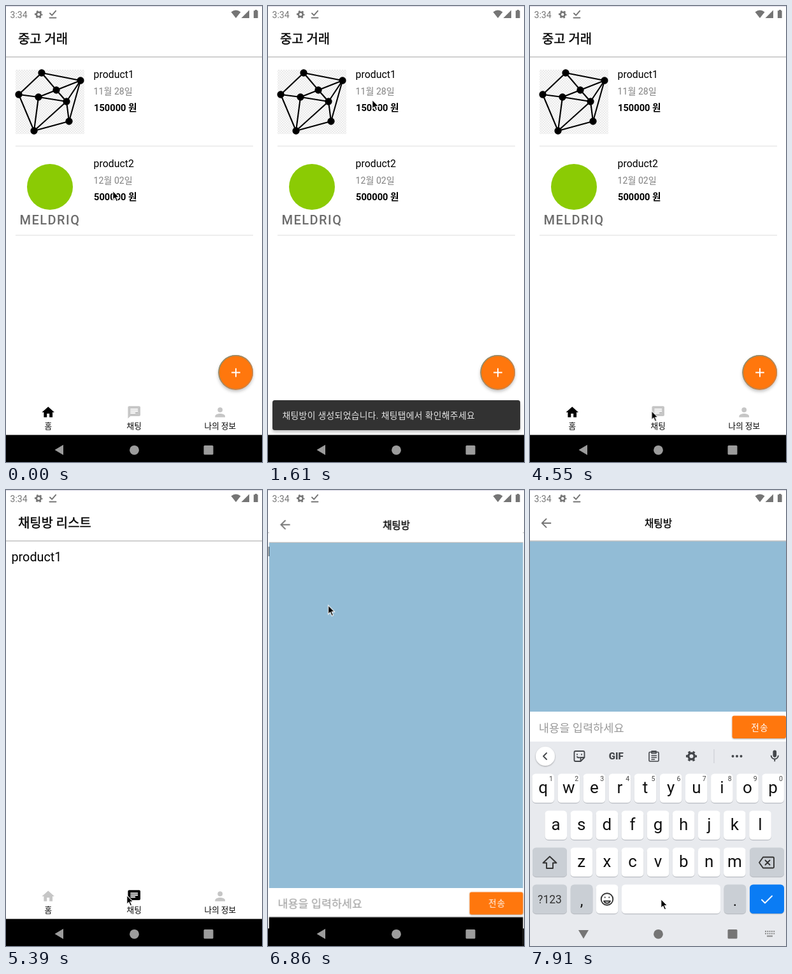
Animation of 402 by 716 pixels, one loop 8 s. Source, as an HTML page:

```html
<!DOCTYPE html>
<html lang="ko">
<head>
<meta charset="utf-8">
<title>중고 거래</title>
<style>
html, body { margin: 0; width: 100%; height: 100%; overflow: hidden; background: #fff; }
svg.stage { display: block; width: 402px; height: 716px; }
text { font-family: Roboto, "Noto Sans CJK KR", "Noto Sans CJK", sans-serif; }
.mid { text-anchor: middle; }
.heavy { stroke: #000; stroke-width: .4px; }
.line { fill: none; stroke-linecap: round; stroke-linejoin: round; }
.nav-label { font-size: 12.6px; text-anchor: middle; }
.name { font-size: 15.9px; }
.date { font-size: 14.1px; fill: #808080; }
.price { font-size: 14.66px; font-weight: 700; }

/* one shared 8 s clock: 1% = 80 ms */
.old, .home, .rooms, .home-tab, .chat-tab, .snack, .chat, .compose, .caret,
.keyboard, .nav, .back, .kb-icon, .pointer, .ring {
  animation: 8s linear infinite both;
}
.old, .chat { transform-origin: 201px 358px; }
.home { animation-name: home; }
.rooms { animation-name: rooms; }
.home-tab { animation-name: home-tab; }
.chat-tab { animation-name: chat-tab; }
.old { animation-name: old; }
.chat { animation-name: chat; }
.snack { animation-name: snack; transform-origin: 201px 642px; }
.compose { animation-name: compose; }
.caret { animation-name: caret; }
.keyboard { animation-name: keyboard; }
.nav { animation-name: nav; }
.back { animation-name: back; transform-origin: 84px 697px; }
.kb-icon { animation-name: kb-icon; }
.pointer { animation-name: pointer; }
.ring { animation-name: ring; }

@keyframes home { 0%, 61.25% { opacity: 1; } 65.6%, 100% { opacity: 0; } }
@keyframes rooms { 0%, 61.25% { opacity: 0; } 65.6%, 100% { opacity: 1; } }
@keyframes home-tab { 0%, 60.6% { fill: #000; } 61.3%, 100% { fill: #c6c6c6; } }
@keyframes chat-tab { 0%, 60.6% { fill: #c6c6c6; } 61.3%, 100% { fill: #000; } }
@keyframes old {
  0%, 82.24% { transform: none; }
  82.25%, 83% { transform: scale(1.0185); animation-timing-function: ease-out; }
  86.7%, 100% { transform: scale(1.05); }
}
@keyframes chat {
  0%, 82.24% { opacity: 0; transform: scale(.85); }
  82.25%, 83% { opacity: .33; transform: scale(.912, .905); }
  83.9% { opacity: 1; transform: scale(.955, .953); animation-timing-function: ease-out; }
  86.8%, 100% { opacity: 1; transform: none; }
}
@keyframes snack {
  0%, 17.2% { opacity: 0; transform: scale(.8); animation-timing-function: ease-out; }
  19.2% { opacity: 1; transform: scale(.985); }
  20.1%, 55% { opacity: 1; transform: none; }
  56%, 100% { opacity: 0; transform: none; }
}
@keyframes compose {
  0%, 91.8% { transform: translateY(279px); }
  91.81%, 100% { transform: none; }
}
@keyframes caret {
  0%, 92.7% { opacity: 0; }
  92.71%, 98.85% { opacity: 1; }
  98.86%, 100% { opacity: 0; }
}
@keyframes keyboard {
  0%, 92.2% { opacity: 0; transform: translateY(321px); }
  92.74%, 93.4% { opacity: .16; transform: translateY(242px); }
  94.5% { opacity: .7; transform: translateY(75px); animation-timing-function: ease-out; }
  96.2%, 100% { opacity: 1; transform: none; }
}
@keyframes nav { 0%, 93.4% { fill: #9c9c9c; } 95%, 100% { fill: #757575; } }
@keyframes back { 0%, 93.4% { transform: none; } 96.2%, 100% { transform: rotate(-90deg); } }
@keyframes kb-icon { 0%, 92.2% { opacity: 0; } 92.74%, 100% { opacity: 1; } }
@keyframes pointer {
  0% { transform: translate(166px, 290px); }
  3.5%, 7% { transform: translate(165px, 263px); animation-timing-function: ease-in-out; }
  9.6%, 11.2% { transform: translate(158px, 152px); }
  12.2%, 24.5% { transform: translate(162px, 147px); animation-timing-function: ease-in-out; }
  28%, 32.4% { transform: translate(201px, 385px); animation-timing-function: ease-in-out; }
  35%, 39.4% { transform: translate(201px, 497px); }
  42.2% { transform: translate(210px, 538px); }
  44.6%, 47.3% { transform: translate(201px, 567px); animation-timing-function: ease-in-out; }
  52.5% { transform: translate(196px, 632px); }
  57.7%, 68.3% { transform: translate(188px, 636px); animation-timing-function: ease-in-out; }
  71.7%, 74.4% { transform: translate(80px, 203px); animation-timing-function: ease-in-out; }
  77.8%, 84% { transform: translate(76px, 111px); animation-timing-function: ease-in-out; }
  91%, 100% { transform: translate(204px, 642px); }
}
@keyframes ring {
  0%, 9.4% { opacity: 0; } 10%, 11% { opacity: 1; } 12%, 13.6% { opacity: 0; }
  14.9%, 17.4% { opacity: 1; } 18.6%, 58.3% { opacity: 0; }
  59%, 60.6% { opacity: 1; } 61.8%, 78.4% { opacity: 0; }
  79%, 79.9% { opacity: 1; } 80.5%, 100% { opacity: 0; }
}
</style>
</head>
<body>
<svg class="stage" viewBox="0 0 402 716" xmlns="http://www.w3.org/2000/svg">
  <defs>
    <pattern id="checker" width="4" height="4" patternUnits="userSpaceOnUse">
      <path fill="#fafafa" d="M0 0h4v4H0z"/>
      <path fill="#ebebeb" d="M0 0h2v2H0zM2 2h2v2H2z"/>
    </pattern>
    <linearGradient id="rim" x2="1" y2="1">
      <stop offset="0" stop-color="#74917f"/>
      <stop offset=".55" stop-color="#a48a68"/>
      <stop offset="1" stop-color="#e87c2c"/>
    </linearGradient>
    <filter id="lift" x="-30%" y="-30%" width="160%" height="170%">
      <feDropShadow dx="0" dy="3" stdDeviation="2.5" flood-opacity=".24"/>
    </filter>
    <filter id="low" x="-10%" y="-20%" width="120%" height="150%">
      <feDropShadow dx="0" dy="1" stdDeviation="1" flood-opacity=".35"/>
    </filter>
    <symbol id="house" viewBox="0 0 24 24"><path d="M10 20v-6h4v6h5v-8h3L12 3 2 12h3v8z"/></symbol>
    <symbol id="bubble" viewBox="0 0 24 24"><path d="M20 2H4c-1.1 0-2 .9-2 2v18l4-4h14c1.1 0 2-.9 2-2V4c0-1.1-.9-2-2-2zM6 9h12v2H6zm8 5H6v-2h8zm4-6H6V6h12z"/></symbol>
    <symbol id="person" viewBox="0 0 24 24"><circle cx="12" cy="8" r="4"/><path d="M12 14c-2.67 0-8 1.34-8 4v2h16v-2c0-2.66-5.33-4-8-4z"/></symbol>
    <symbol id="arrow" viewBox="0 0 24 24"><path d="M20 11H7.83l5.59-5.59L12 4l-8 8 8 8 1.41-1.41L7.83 13H20z"/></symbol>
    <symbol id="mic" viewBox="0 0 24 24"><rect x="9" y="2" width="6" height="12" rx="3"/><path d="M17 11a5 5 0 0 1-10 0H5a7 7 0 0 0 6 6.92V21h2v-3.08A7 7 0 0 0 19 11z"/></symbol>
    <symbol id="gear" viewBox="0 0 24 24">
      <g fill="none" stroke="currentColor">
        <circle cx="12" cy="12" r="5.4" stroke-width="4"/>
        <circle cx="12" cy="12" r="8.1" stroke-width="3.4" stroke-dasharray="4 4.48" stroke-dashoffset="2"/>
      </g>
    </symbol>
  </defs>
  <rect width="402" height="716" fill="#fff"/>

  <g class="old">
    <g class="home">
      <text class="heavy" x="19" y="59.3" font-size="19.9">중고 거래</text>
      <rect x="15" y="100" width="108" height="101" fill="url(#checker)"/>
      <g id="graph" stroke="#000" stroke-width="2.1"></g>
      <circle cx="69" cy="284" r="36" fill="#8bcb04"/>
      <text class="mid" x="69" y="343" font-size="20" font-weight="500" letter-spacing="1.5" fill="#6c6c6c">MELDRIQ</text>
      <text class="name" x="137.6" y="113.4">product1</text>
      <text class="date" x="137.6" y="138.8">11월 28일</text>
      <text class="price" x="138" y="165">150000 원</text>
      <text class="name" x="137.6" y="253.4">product2</text>
      <text class="date" x="137.6" y="278.8">12월 02일</text>
      <text class="price" x="138" y="305">500000 원</text>
      <path stroke="#dedede" d="M15 220h373M15 360h373" stroke-width="1.2"/>
      <circle cx="360.7" cy="575.3" r="27.3" fill="#ff7711" filter="url(#lift)"/>
      <circle cx="360.7" cy="575.3" r="26.6" fill="none" stroke="url(#rim)" stroke-width="1.6"/>
      <path stroke="#fff" stroke-width="1.9" d="M354.1 575.5h13.7M361 568.7v13.7"/>
    </g>
    <g class="rooms">
      <text class="heavy" x="19" y="59.3" font-size="19.9">채팅방 리스트</text>
      <text x="8.5" y="111.6" font-size="19.8">product1</text>
    </g>
    <path stroke="#c0c0c0" stroke-width="1.4" d="M-9 80h420"/>
    <use class="home-tab" href="#house" x="54.5" y="626.3" width="23.45" height="23.45"/>
    <use class="chat-tab" href="#bubble" x="189.5" y="626.3" width="23.45" height="23.45"/>
    <use href="#person" x="324.5" y="626.3" width="23.45" height="23.45" fill="#c6c6c6"/>
    <text class="nav-label" x="66.2" y="663.8">홈</text>
    <text class="nav-label" x="201.2" y="663.8">채팅</text>
    <text class="nav-label" x="336.3" y="663.8">나의 정보</text>
    <g class="snack">
      <rect x="7" y="619" width="389" height="47" rx="3.5" fill="#323232" filter="url(#lift)"/>
      <text x="22.5" y="647.8" font-size="13.8" letter-spacing=".36" fill="#e6e6e6">채팅방이 생성되었습니다. 채팅탭에서 확인해주세요</text>
    </g>
    <rect x="-10" y="673.5" width="422" height="60"/>
  </g>

  <g class="chat">
    <rect width="402" height="716" fill="#fff"/>
    <rect y="80" width="402" height="594" fill="#92bcd6"/>
    <path stroke="#c0c0c0" stroke-width="1.4" d="M0 80h402"/>
    <use href="#arrow" x="13.6" y="40.3" width="23.45" height="23.45" fill="#757575"/>
    <text class="heavy mid" x="201.5" y="58" font-size="15.64">채팅방</text>
    <g class="compose">
      <rect y="348" width="402" height="325" fill="#fff"/>
      <text x="13.8" y="379.6" font-size="17.6" fill="#9a9a9a">내용을 입력하세요</text>
      <rect class="caret" x="13.2" y="361" width="2" height="24" fill="#1fcfc0"/>
      <rect x="317.5" y="354.5" width="84.5" height="35.5" rx="3" fill="#ff7711" filter="url(#low)"/>
      <text class="mid" x="361" y="377.6" font-size="13.7" letter-spacing="1.1" fill="#fff">전송</text>
    </g>
    <!-- tall enough to hide the lowered compose panel -->
    <rect y="673.5" width="402" height="300"/>
  </g>

  <g class="keyboard">
    <rect y="395" width="402" height="321" fill="#e8eaee"/>
    <circle cx="24" cy="418" r="15" fill="#fff" filter="url(#low)"/>
    <g class="line" stroke="#44474b" stroke-width="1.8">
      <path d="M26 413l-5 5 5 5"/>
      <path d="M71.5 410h12a2 2 0 0 1 2 2v8l-6 6h-8a2 2 0 0 1-2-2v-12a2 2 0 0 1 2-2zM85 420h-5.5v5.5M74 415v.5M81 415v.5M74 419q2 2 4 1"/>
      <path d="M189 411.5h11.5a1.5 1.5 0 0 1 1.5 1.5v11.5a1.5 1.5 0 0 1-1.5 1.5h-12a1.5 1.5 0 0 1-1.5-1.5v-11.5a1.5 1.5 0 0 1 1.5-1.5M191 410h7v3.5h-7zM191 417h7.5M191 420h7.5M191 423h4.5" stroke-width="1.6"/>
    </g>
    <text class="mid" x="135.3" y="423.3" font-size="15" font-weight="900" fill="#44474b">GIF</text>
    <use href="#gear" x="243" y="407.5" width="21" height="21" color="#44474b"/>
    <path stroke="#c8cbd0" d="M289 407v22"/>
    <g fill="#44474b">
      <circle cx="318.5" cy="418" r="2"/><circle cx="325" cy="418" r="2"/><circle cx="331.5" cy="418" r="2"/>
      <use href="#mic" x="373" y="406.5" width="22.5" height="22.5"/>
    </g>
    <g id="keys"></g>
    <text class="mid" x="31" y="649" font-size="17.5" fill="#333">?123</text>
    <g class="line" stroke="#333" stroke-width="1.9">
      <path d="M31 575.5l10.5 10h-5.5v8.5h-10v-8.5h-5.5z"/>
      <path d="M366 576.5h15.5a1.5 1.5 0 0 1 1.5 1.5v14a1.5 1.5 0 0 1-1.5 1.5H366l-6-8.5zM369.5 581.5l7 7M376.5 581.5l-7 7"/>
      <circle cx="121" cy="642.5" r="9.3"/>
      <path d="M116 645.5a5.4 5.4 0 0 0 10 0zM117.7 639.5v.3M124.3 639.5v.3"/>
      <path d="M364 643.5l5 5 11-11" stroke="#fff"/>
    </g>
  </g>

  <g id="system">
    <rect width="402" height="1" fill="#d6d4e2"/>
    <text x="6.6" y="18.5" font-size="14" fill="#757575">3:34</text>
    <g fill="#757575" color="#757575">
      <use href="#gear" x="43.5" y="5.5" width="15.5" height="15.5"/>
      <path class="line" stroke="currentColor" stroke-width="1.9" d="M69 11.5l3.2 3.2 6-7M68.5 18.5h10"/>
      <path d="M353.5 9.5q7.5-6 15 0l-7.5 9.5zM382 6.5v12.5h-12.5z"/>
      <path d="M391 6h3v1.3h1.6v11.7h-6.7V7.3h2.1z"/>
    </g>
    <g class="nav">
      <path class="back" d="M76.5 697l13.5-8v16z"/>
      <circle cx="201.5" cy="697.3" r="7.4"/>
      <rect x="310.5" y="690" width="15" height="14.5" rx="1.5"/>
      <g class="kb-icon" fill="none" stroke="#8a8a8a" stroke-width="2">
        <path d="M369 693h15.2M369 696.5h15.2" stroke-dasharray="2 1.3"/>
        <path d="M372 700.5h9"/>
      </g>
    </g>
  </g>

  <g class="pointer">
    <circle class="ring" cx="2" cy="1" r="22" fill="none" stroke="#333" stroke-opacity=".75" stroke-width="1.8"/>
    <path d="M1.8 .4v14l3.1-2.9 2.4 5.5 2.4-1-2.3-5.4h4.4z" stroke="#fff" stroke-width="1.1"/>
  </g>
</svg>
<script>
const draw = (id, parts) => document.getElementById(id).innerHTML = parts.join('');

const nodes = [[56, 105], [117, 117], [20, 139], [51, 143], [79, 132], [95, 150], [99, 181], [44, 196]];
const edges = '01 02 04 23 27 34 35 37 45 41 51 57 56 67 16'.split(' ');
draw('graph', [
  ...edges.map(([a, b]) => `<path d="M${nodes[a]}L${nodes[b]}"/>`),
  ...nodes.map(([x, y]) => `<circle cx="${x}" cy="${y}" r="4.6"/>`)
]);

const key = (x, y, w, fill = '#fff') =>
  `<rect x="${x}" y="${y + 1.2}" width="${w}" height="45.5" rx="5.5" fill="#b9bcc2"/>` +
  `<rect x="${x}" y="${y}" width="${w}" height="45.5" rx="5.5" fill="${fill}"/>`;
const label = (text, x, y, size, fill = '#111') =>
  `<text class="mid" x="${x}" y="${y}" font-size="${size}" fill="${fill}">${text}</text>`;
const row = (letters, first, y, digits) => [...letters].map((c, i) => {
  const x = first + i * 40.1;
  return key(x - 17.3, y, 34.6) + label(c, x, y + 30, 26) +
    (digits ? label((i + 1) % 10, x + 12.3, y + 11.5, 10.5, '#444') : '');
});
const grey = '#cacfd5';
draw('keys', [
  ...row('qwertyuiop', 20.7, 445.5, true),
  ...row('asdfghjkl', 40.7, 503.5),
  ...row('zxcvbnm', 80.8, 561.5),
  key(4, 561.5, 54, grey), key(345, 561.5, 54, grey),
  key(4, 619.5, 54, grey), key(63.8, 619.5, 34.6, grey),
  key(103.8, 619.5, 34.6), key(144, 619.5, 155),
  key(304.6, 619.5, 34.6, grey), key(345, 619.5, 54, '#0a7cf4'),
  label(',', 81, 653, 24), label('.', 322, 653, 24)
]);
</script>
</body>
</html>
```
